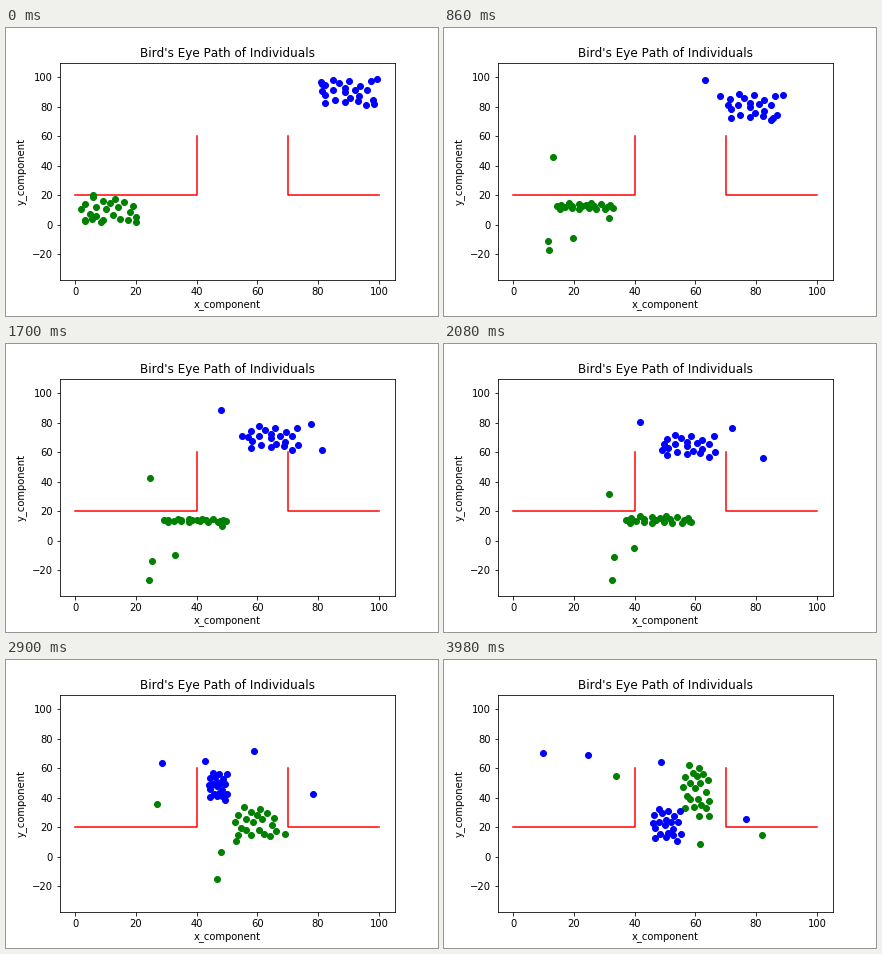
Write a matplotlib script that moves like this. It is 432 by 288 pixels and loops after 4000 ms.

```python
import matplotlib.pyplot as plt
import numpy as np
from matplotlib.animation import FuncAnimation

FRAMES, STEP = 200, 20
TIMES = np.array([0, 1220, 2460, 2900, 3980])  # ms of the key points below

plt.rcParams["text.kerning_factor"] = 6


def smooth(keys, t):
    """Cubic Hermite curve through key points placed at TIMES."""
    slopes = np.gradient(keys, TIMES, axis=0)
    i = min(np.searchsorted(TIMES, t, side="right") - 1, len(TIMES) - 2)
    h = TIMES[i + 1] - TIMES[i]
    u = (t - TIMES[i]) / h
    w = u * u * (3 - 2 * u)
    bend = u * (1 - u) ** 2 * slopes[i] - u * u * (1 - u) * slopes[i + 1]
    return keys[i] * (1 - w) + keys[i + 1] * w + h * bend


def scatter(n, seed):
    """Evenly spread places in the square from -1 to 1, slightly jittered."""
    rng = np.random.default_rng(seed)
    i = np.arange(n)
    even = np.column_stack([(i + 0.5) / n, (0.5 + i * 0.618034) % 1])
    return np.clip(2 * even - 1 + rng.uniform(-0.12, 0.12, (n, 2)), -1, 1)


class Group:
    """A crowd that shifts and stretches as one, plus people on their own paths."""

    def __init__(self, ax, style, size, seed, crowd, loners):
        self.crowd = np.array(crowd, float)
        self.loners = np.array(loners, float).swapaxes(0, 1)
        self.places = scatter(size, seed)
        self.dots, = ax.plot([], [], style)

    def move(self, t):
        area = smooth(self.crowd, t)
        people = area[:2] + self.places * area[2:]
        self.dots.set_data(*np.vstack([people, smooth(self.loners, t)]).T)
        return self.dots


fig, ax = plt.subplots(figsize=(6, 4), dpi=72)
fig.subplots_adjust(left=0.125, right=0.9, bottom=0.125, top=0.88)
ax.set(xlim=(-5.01, 105.26), ylim=(-37.4, 109.8),
       xlabel="x_component", ylabel="y_component",
       title="Bird's Eye Path of Individuals")
ax.plot([0, 40, 40], [20, 20, 60], "r")
ax.plot([70, 70, 100], [60, 20, 20], "r")

# Crowd rows: centre x, centre y, half width, half height
groups = [
    Group(ax, "go", 20, 4,
          crowd=[(10.5, 10.5, 10, 8.5), (29, 13.5, 10.5, 0.8), (54, 17, 11, 5.5),
                 (59, 23.5, 7.5, 10.5), (60, 47, 4.8, 16)],
          loners=[[(6, 20), (16.5, 51), (33, 27.5), (27, 35.5), (34, 54.5)],
                  [(5.6, 3.7), (15.8, -22.7), (39.8, -23.3), (46.7, -15.3), (61.4, 8.6)],
                  [(3.3, 2.5), (16.2, -14), (40.8, -5.7), (48, 3.2), (61.2, 27.3)],
                  [(8.6, 2), (24.7, -11.2), (46.3, 1), (52.8, 10.6), (64.4, 27.3)],
                  [(20, 2), (37.2, 6.5), (65, 15.3), (69, 15.3), (81.9, 14.6)]]),
    Group(ax, "bo", 21, 7,
          crowd=[(89.5, 90, 9, 8.8), (73.5, 75.5, 8.5, 9), (52, 58, 7.5, 8),
                 (47, 48, 3.2, 9.5), (50.5, 22, 5, 11)],
          loners=[[(81.1, 96.8), (56.2, 96), (35.8, 72.3), (28.6, 63.4), (9.8, 70.3)],
                  [(98.3, 82), (81.8, 68.2), (81.8, 50), (78.2, 42.3), (76.6, 25.5)],
                  [(81.4, 95.4), (62.8, 82.5), (45, 58), (42.8, 64.9), (24.7, 68.9)],
                  [(99.3, 98.8), (84.1, 83.8), (66.3, 73.6), (58.8, 71.6), (48.7, 64.1)]]),
]


def update(frame):
    return [group.move(frame * STEP) for group in groups]


anim = FuncAnimation(fig, update, frames=FRAMES, interval=STEP, repeat=True)
plt.show()
```
